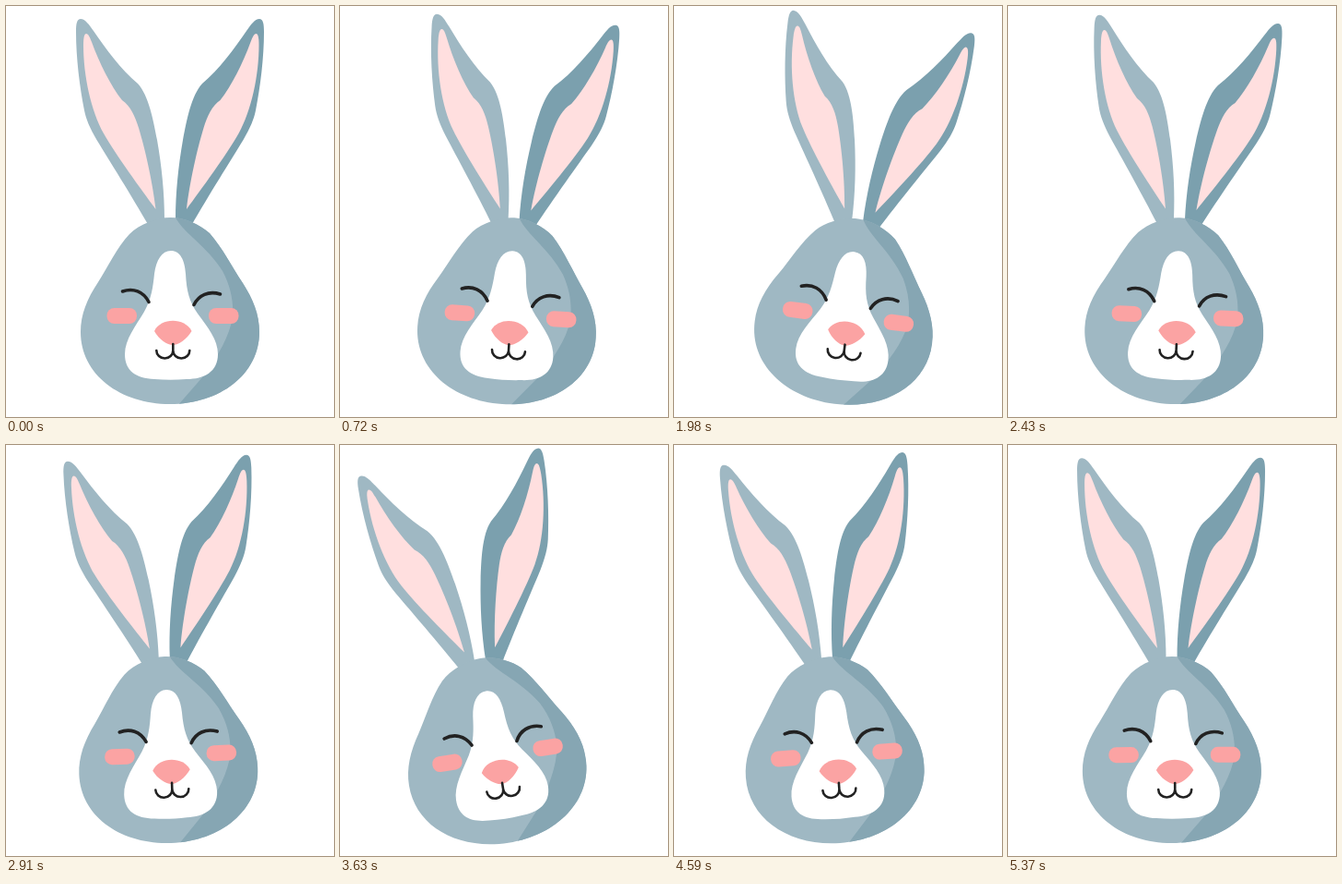
Write an HTML page that moves like this. It is 356 by 445 pixels and loops after 5400 ms.

```html
<!DOCTYPE html>
<html lang="en">
<head>
<meta charset="utf-8">
<title>Swaying rabbit</title>
<style>
  html, body { margin: 0; width: 100%; height: 100%; overflow: hidden; background: #fff; }
  svg { display: block; width: 100%; height: 100%; }
</style>
</head>
<body>
<svg viewBox="0 0 356 445">
  <defs>
    <path id="ear" d="M76 28C76 19 77 14 81 14C86 14 90 20 95 27C108 46 125 69 143 84C155 97 160 124 164 145C169 174 172 202 172 232L155 238C136 205 112 167 98.500 145C91 132 87 123 85 113C80 88 76 56 76 28Z"/>
    <path id="inner-ear" fill="#ffdfdf" d="M84 42C84 34 85 30 87 30C89.500 30 91 34 93 39C101 61 114 87 126 102C135 108 140 119 144 132C151 155 159 190 162.500 220C147 199 119 161 106 138C92 113 84 75 84 42Z"/>
    <path id="skull" d="M178.500 229C164 229 145 236 134 247C120 262 111 282 100 299C88 317 81 334 81 353C81 399 124 431 178 431C232 431 275 399 275 353C275 334 268 317 257 300C245 282 235 262 221 246C210 236 193 229 178.500 229Z"/>
    <clipPath id="skull-clip"><use href="#skull"/></clipPath>
  </defs>
  <g id="rabbit">
    <use href="#ear" fill="#9fb8c3"/>
    <use href="#inner-ear"/>
    <g transform="matrix(-1 0 0 1 356 0)">
      <use href="#ear" fill="#7ba0ae"/>
      <use href="#inner-ear" x="-2.500"/>
    </g>
    <use href="#skull" fill="#9fb8c3"/>
    <path clip-path="url(#skull-clip)" fill="#86a6b3" d="M182 225C190 245 217 258 235 287C244 304 247 320 246 336C243 357 230 379 214 401L186 433H290V225Z"/>
    <path fill="#fff" d="M179 265C189 265 194 275 195 290C196 309 199 320 208 333C219 348 230 361 230 377C230 396 215 404 196 404C184 405 173 405 161 404C141 403 129 395 129 377C129 361 141 346 150 331C158 317 159.500 304 161 290C163 275 169 265 179 265Z"/>
    <g fill="#fba3a3">
      <rect x="109.500" y="327" width="32.500" height="17" rx="8"/>
      <rect x="220" y="327" width="32.500" height="17" rx="8"/>
      <path d="M161 352C168 337 194 337 201.500 352C196 361 187 367 181 367C175 367 166 361 161 352Z"/>
    </g>
    <g fill="none" stroke="#222" stroke-linecap="round">
      <path stroke-width="3.600" d="M126.500 309C138 305 149 309 155 320.500M204 323.500C209 313 220 308 232.500 312"/>
      <path stroke-width="2.600" d="M181.300 366V372.500M163.300 373A9 8.500 0 0 0 181.300 373A9 8.500 0 0 0 199.300 373"/>
    </g>
  </g>
</svg>
<script>
  const LOOP = 5400, STEP = 30, TILT = 9;
  const PIVOT = "178 400";
  const rabbit = document.getElementById("rabbit");

  // Triangle sway: centre, right, left, centre, in three equal linear legs.
  function angleAt(time) {
    const leg = time / (LOOP / 3);
    if (leg < 1) return TILT * leg;
    if (leg < 2) return TILT * (3 - 2 * leg);
    return TILT * (leg - 3);
  }

  function draw(now) {
    const time = Math.floor((now % LOOP) / STEP) * STEP;
    rabbit.setAttribute("transform", `rotate(${angleAt(time)} ${PIVOT})`);
  }

  const start = performance.now();
  function tick() {
    draw(performance.now() - start);
    requestAnimationFrame(tick);
  }
  tick();
</script>
</body>
</html>
```
